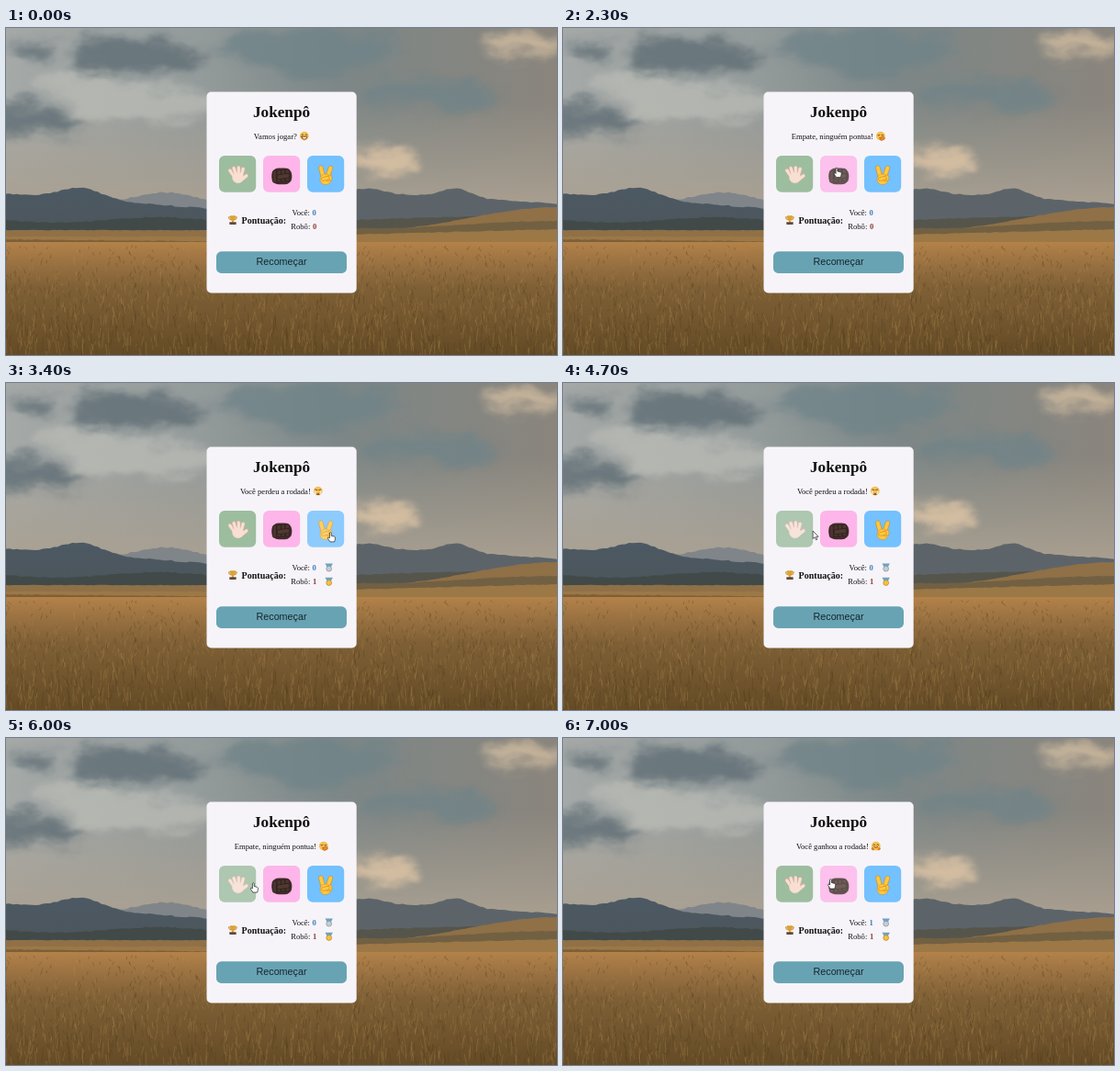
Recreate the animation shown at these times as an HTML page. Size 600 px wide and 356 px high, loop 8 s.

```html
<!DOCTYPE html>
<html lang="pt">
<head>
<meta charset="utf-8">
<title>Jokenpô</title>
<style>
html, body { margin: 0; width: 100%; height: 100%; overflow: hidden; background: #8b8c89; }
svg { display: block; width: 600px; height: 356px; }
text { font-family: "Liberation Serif", "Times New Roman", serif; font-size: 8.61px; fill: #111; }
.bold { font-weight: bold; }
.line { fill: none; stroke-linecap: round; stroke-linejoin: round; }
</style>
</head>
<body>
<svg viewBox="0 0 600 356" xmlns="http://www.w3.org/2000/svg">
  <defs>
    <linearGradient id="sky">
      <stop offset="0" stop-color="#a5a9a7"/>
      <stop offset=".35" stop-color="#949b9b"/>
      <stop offset=".6" stop-color="#7d8787"/>
      <stop offset="1" stop-color="#8a857d"/>
    </linearGradient>
    <linearGradient id="haze" x2="0" y2="1">
      <stop offset=".4" stop-color="#aaa091" stop-opacity="0"/>
      <stop offset="1" stop-color="#aaa091"/>
    </linearGradient>
    <linearGradient id="range" x2="0" y2="1">
      <stop offset="0" stop-color="#4d5963"/>
      <stop offset="1" stop-color="#4a5458"/>
    </linearGradient>
    <linearGradient id="field" x2="0" y2="1">
      <stop offset="0" stop-color="#b38249"/>
      <stop offset=".2" stop-color="#987041"/>
      <stop offset=".4" stop-color="#7f6036"/>
      <stop offset="1" stop-color="#644b26"/>
    </linearGradient>
    <filter id="cloud" x="-10%" y="-10%" width="120%" height="120%" color-interpolation-filters="sRGB">
      <feGaussianBlur stdDeviation="6" result="soft"/>
      <feTurbulence type="fractalNoise" baseFrequency=".018 .03" numOctaves="4" seed="4"/>
      <feDisplacementMap in="soft" scale="38" xChannelSelector="R" yChannelSelector="G"/>
    </filter>
  </defs>

  <rect width="600" height="230" fill="url(#sky)"/>
  <rect width="600" height="200" fill="url(#haze)"/>
  <g filter="url(#cloud)">
    <g fill="#627077" opacity=".85">
      <ellipse cx="32" cy="25" rx="22" ry="9"/>
      <ellipse cx="145" cy="30" rx="75" ry="20"/>
      <ellipse cx="30" cy="102" rx="52" ry="15"/>
    </g>
    <g fill="#6f8388" opacity=".75">
      <ellipse cx="330" cy="25" rx="100" ry="25"/>
      <ellipse cx="465" cy="72" rx="75" ry="16"/>
    </g>
    <g fill="#bbbcb6" opacity=".75">
      <ellipse cx="145" cy="82" rx="80" ry="20"/>
      <ellipse cx="80" cy="60" rx="45" ry="14"/>
    </g>
    <g fill="#d3bda1">
      <ellipse cx="562" cy="18" rx="36" ry="12" opacity=".8"/>
      <ellipse cx="415" cy="144" rx="36" ry="14"/>
    </g>
  </g>
  <g id="land"></g>
  <rect y="233" width="600" height="123" fill="url(#field)"/>
  <g id="grass" class="line" stroke-width=".8"></g>

  <rect x="218.5" y="69.5" width="163.2" height="219" rx="5" fill="#f6f4f9"/>
  <text class="bold" x="300" y="96.6" text-anchor="middle" style="font-size:17.22px">Jokenpô</text>
  <text id="message" y="120.8"></text>
  <g id="faces" class="line" stroke="#5b321c" stroke-width=".8">
    <g>
      <path d="M-3-1.2q1-1.5 2 0M1-1.2q1-1.5 2 0"/>
      <path d="M-3 .7H3Q2.4 3.6 0 3.6T-3 .7Z" fill="#fff"/>
    </g>
    <g>
      <path d="M-3-1q1 1 2 0M1-1q1 1 2 0"/>
      <path d="M-1 2L3 .6Q5 1.4 4.2 3.4L1 4.8Q-1.4 4.3-1 2Z" fill="#e98d27" stroke="#b9651a"/>
    </g>
    <g>
      <path d="M-3-1.6l2 .5M3-1.6l-2 .5M-1.3 3.4Q0 .8 1.3 3.4Z"/>
      <path d="M-3 .4V2.8M3 .4V2.8" stroke="#dceaf0" stroke-width="1.4"/>
    </g>
    <g>
      <path d="M-3-1.2q1-1.5 2 0M1-1.2q1-1.5 2 0M-2 .9Q0 3 2 .9"/>
      <path d="M-3.8 2.8l.8.8M3.8 2.8l-.8.8" stroke="#e07f22" stroke-width="2.6"/>
    </g>
  </g>

  <g id="choices"></g>

  <g>
    <path d="M243.8 205.8H242.5Q242.6 209 245 209M250 205.8H251.3Q251.2 209 249 209" class="line" stroke="#c98a20"/>
    <path d="M244 204.3H250Q250.3 209 247.8 210V212H246V210Q243.7 209 244 204.3Z" fill="#dca136"/>
    <rect x="243.3" y="211.3" width="7.4" height="2.7" rx=".4" fill="#65483a"/>
  </g>
  <text class="bold" x="256.5" y="212.6" style="font-size:10.07px">Pontuação:</text>
  <text x="311.6" y="203.8">Você:</text>
  <text x="310.3" y="219.2">Robô:</text>
  <text id="you" class="bold" x="333.4" y="203.8" style="fill:#3b7fb5"></text>
  <text id="robot" class="bold" x="334" y="219.2" style="fill:#8b4038"></text>
  <g id="medals"></g>

  <rect x="229" y="243.3" width="142" height="23.6" rx="5.5" fill="#68a3b4"/>
  <text x="300" y="258.4" text-anchor="middle" style="font:10.76px 'Liberation Sans',Arial,sans-serif;fill:#17262b">Recomeçar</text>

  <g id="cursor" stroke="#222" stroke-width=".7" stroke-linejoin="round" fill="#fff">
    <path id="arrow" d="M0 0V8.5L2 6.8L3.4 9.8L4.7 9.2L3.4 6.3H6Z"/>
    <path id="pointer" d="M-.9 .7Q0-.6 .9 .7V4L4.4 4.9Q5.5 5.3 5.2 7L4.4 10.6H-.4L-2.9 6.9Q-3 5.5-1.7 5.8L-.9 6.6Z"/>
  </g>
</svg>
<script>
const LOOP = 8000, STEP = 100;
const $ = id => document.getElementById(id);
const ease = p => p * p * (3 - 2 * p);
const clamp = p => Math.min(1, Math.max(0, p));
const times = (n, draw) => Array.from({ length: n }, (_, i) => draw(i)).join('');

let seed = 17;
const rand = () => (seed = (seed * 16807) % 2147483647) / 2147483647;

// Landscape, from the far peaks to the near hills.
const bump = (x, center, width) => Math.exp(-(((x - center) / width) ** 2));
const ridge = (from, to, fill, rough, height) => {
  let d = `M${from} 240`;
  for (let x = from; x <= to; x += 4) d += `L${x} ${(height(x) + rough * (rand() - .5)).toFixed(1)}`;
  return `<path d="${d}V240Z" fill="${fill}"/>`;
};
$('land').innerHTML =
  ridge(120, 232, '#80858a', 1.5, x => 190 - 11 * bump(x, 172, 42)) +
  ridge(0, 232, 'url(#range)', 1.4, x => 180 + .075 * x - 12 * bump(x, 82, 32)) +
  ridge(372, 600, '#5d6469', 1.2, x => 178 + .06 * (x - 380) - 4 * bump(x, 395, 20) - 10 * bump(x, 490, 22)) +
  ridge(0, 232, '#414a48', 1.5, x => 209 + 3 * Math.sin(x / 35)) +
  ridge(372, 600, '#55554c', 1, x => 209 - .03 * (x - 372)) +
  ridge(0, 600, '#8f7047', .6, x => 220 - 25 * ease(clamp((x - 400) / 200))) +
  ridge(372, 600, '#726042', .8, x => 218 - 8 * ease(clamp((x - 400) / 200))) +
  ridge(0, 600, '#9c7847', .8, x => 227 - 8 * clamp((x - 300) / 300)) +
  ridge(0, 232, '#7d6039', 1, x => 230 + x / 100);

// Grass blades grow longer toward the viewer.
const blade = () => {
  const depth = rand(), h = 2 + 16 * depth * rand();
  const x = rand() * 600, y = 238 + depth * 124;
  return `M${x.toFixed(1)} ${y.toFixed(1)}l${(rand() * 5 - 2.5).toFixed(1)} ${(-h).toFixed(1)}`;
};
const blades = (count, color, opacity) => `<path d="${times(count, blade)}" stroke="${color}" opacity="${opacity}"/>`;
$('grass').innerHTML = blades(900, '#4d391c', .4) + blades(800, '#a78046', .4) + blades(300, '#be9658', .35);

// Hands: fingers fan out around the palm.
const finger = (x, y, angle, length, width, fill, edge) =>
  `<rect x="${x - width / 2}" y="${y - length}" width="${width}" height="${length}" rx="${width / 2}"
    transform="rotate(${angle} ${x} ${y})" fill="${fill}" stroke="${edge}" stroke-width=".6"/>`;
const palm = (x, y, fill, edge) => `<ellipse cx="${x}" cy="${y}" rx="6" ry="5.8" fill="${fill}" stroke="${edge}" stroke-width=".5"/>`;
const paper = () => {
  const skin = ['#f8dfd2', '#cfa997'];
  return times(4, i => finger(250.3 + 1.7 * i, 164, 17 * i - 36, 14.5 - Math.abs(i - 1.5), 4, ...skin)) +
    finger(254, 167, 52, 12, 4, ...skin) + palm(252.6, 163, skin[0], skin[0]);
};
const rock = () => '<rect x="289.3" y="152.6" width="22" height="17.6" rx="7.5" fill="#412d2a"/>' +
  times(4, i => finger(292.6 + 4.6 * i, 168.5 - i / 2, 0, 13.5, 4.6, '#4a342e', '#271b19')) +
  finger(295, 162.5, 82, 14, 5, '#513931', '#271b19');
const scissors = () => {
  const skin = ['#ffc840', '#cf8a22'];
  return times(2, i => finger(346 + 3.5 * i, 164, 34 * i - 15, 14.5, 4.6, ...skin)) +
    palm(348, 164.8, ...skin) +
    times(2, i => finger(351 + 2.6 * i, 167 - i, -8, 6, 3.4, ...skin)) +
    finger(343.5, 165, 76, 9, 3.8, ...skin);
};
const tiles = [['#9dbd9f', paper], ['#feb5e9', rock], ['#73c1fe', scissors]];
const tileX = i => 232 + 48 * i;
const TILE_Y = 139, TILE = 40.2;
$('choices').innerHTML = tiles.map(([fill, hand], i) =>
  `<g><rect x="${tileX(i)}" y="${TILE_Y}" width="${TILE}" height="39.7" rx="6" fill="${fill}"/>${hand()}</g>`).join('');

const medal = (y, light, dark) => `<g transform="translate(351.7 ${y})">
  <path d="M-4.2-4.5H4.2L1.5 .5H-1.5Z" fill="#6aa3c6"/>
  <circle cy="1.2" r="2.9" fill="${light}" stroke="${dark}" stroke-width=".7"/></g>`;
$('medals').innerHTML = medal(201, '#c5ced5', '#84929b') + medal(216.3, '#f5c242', '#b5842a');

const faces = [...$('faces').children];
faces.forEach(face => face.insertAdjacentHTML('afterbegin', '<circle r="4.9" fill="#f7c052" stroke="none"/>'));
const choices = [...$('choices').children];

const START = 'Vamos jogar?', DRAW = 'Empate, ninguém pontua!';
const LOSS = 'Você perdeu a rodada!', WIN = 'Você ganhou a rodada!';
const moods = [START, DRAW, LOSS, WIN];
const rounds = [[0, START], [500, DRAW], [3200, LOSS], [5100, DRAW], [6800, WIN]];

// Pointer moves: start, end, x, y; it rests in between.
const moves = [
  [100, 200, 298, 152], [2300, 3100, 353.3, 162.3], [4400, 4700, 272.1, 161],
  [4700, 4900, 269.3, 157.5], [6000, 6600, 291.5, 153.5]
];
const pointerAt = t => moves.reduce(([x, y], [from, to, toX, toY]) => {
  const p = ease(clamp((t - from) / (to - from)));
  return [x + (toX - x) * p, y + (toY - y) * p];
}, [455, 275]);
const show = (el, on) => el.setAttribute('visibility', on ? 'visible' : 'hidden');

function showRound(t) {
  const played = rounds.filter(([from]) => from <= t).map(([, result]) => result);
  const result = played[played.length - 1];
  const count = kind => played.filter(r => r === kind).length;
  const message = $('message'), gap = 2.7, faceSize = 10.6;
  message.textContent = result;
  const width = message.getComputedTextLength();
  const left = 300 - (width + gap + faceSize) / 2;
  message.setAttribute('x', left);
  faces.forEach((face, i) => {
    show(face, moods[i] === result);
    face.setAttribute('transform', `translate(${left + width + gap + faceSize / 2} 117.6)`);
  });
  $('you').textContent = count(WIN);
  $('robot').textContent = count(LOSS);
  show($('medals'), count(WIN) + count(LOSS) > 0);
}

function showPointer(t) {
  const visible = t >= moves[0][0];
  const [x, y] = pointerAt(t);
  const inTile = (i, size) => x >= tileX(i) && x <= tileX(i) + size && y >= TILE_Y && y <= TILE_Y + size;
  choices.forEach((choice, i) => choice.setAttribute('opacity', inTile(i, TILE) ? .8 : 1));
  const hand = tiles.some((_, i) => inTile(i, 40));
  $('cursor').setAttribute('transform', `translate(${x.toFixed(2)} ${y.toFixed(2)})`);
  show($('arrow'), visible && !hand);
  show($('pointer'), visible && hand);
}

let shown = -1;
function render(time) {
  const t = Math.floor((time % LOOP) / STEP) * STEP;
  if (t === shown) return;
  shown = t;
  showRound(t);
  showPointer(t);
}

const start = performance.now();
function tick() {
  render(performance.now() - start);
  requestAnimationFrame(tick);
}
tick();
</script>
</body>
</html>
```
